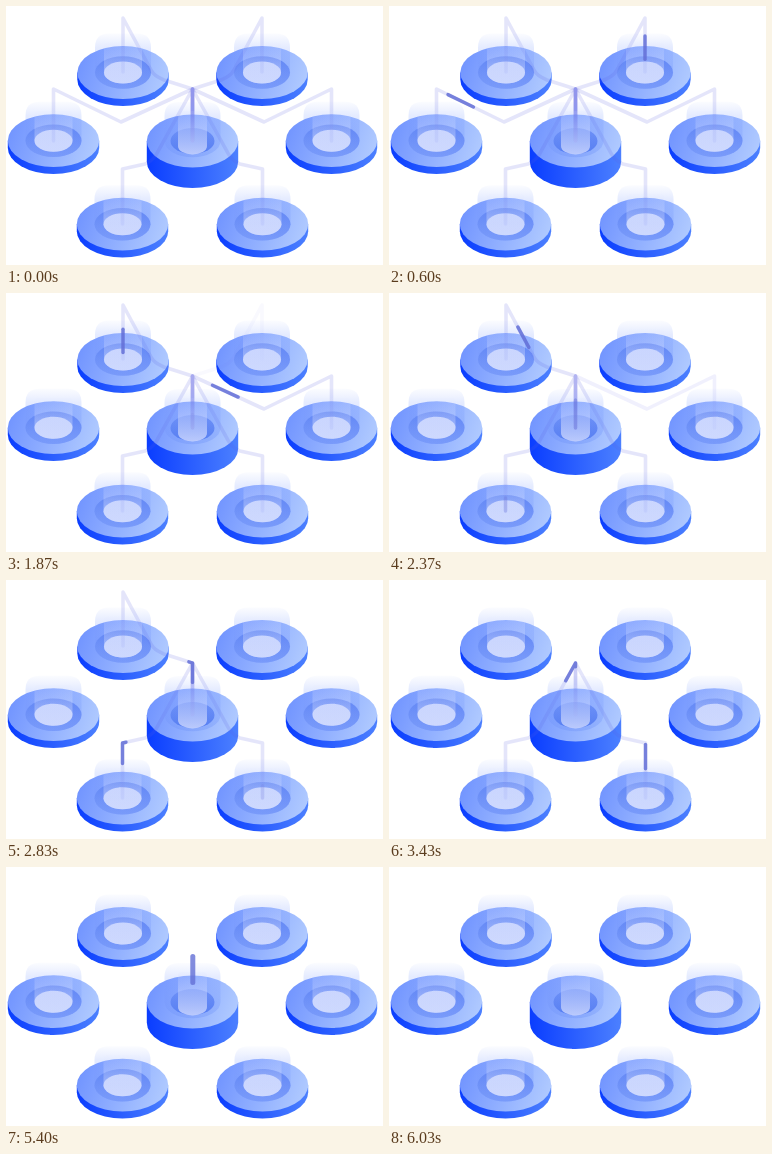
Recreate the animation shown at these times as an HTML page. Size 377 by 259 pixels, loop 6660 ms.

```html
<!DOCTYPE html>
<html lang="en">
<head>
<meta charset="utf-8">
<title>Network nodes</title>
<style>
  html, body { margin: 0; width: 100%; height: 100%; overflow: hidden; background: #fff; }
  svg { display: block; width: 100vw; height: 100vh; }
  .line { fill: none; stroke-linecap: round; stroke-linejoin: round; }
  .track { stroke: #5a5fe0; stroke-opacity: .16; stroke-width: 3.6; }
  .pulse { stroke: #636fd6; stroke-opacity: .85; stroke-width: 3.4; stroke-dasharray: .11 2; }
  .beam { stroke: #636fd6; stroke-opacity: .8; stroke-width: 5; }
</style>
</head>
<body>
<svg id="stage" viewBox="0 0 377 259">
  <defs>
    <linearGradient id="top" x1="0" y1=".4" x2="1" y2=".6">
      <stop offset="0" stop-color="#7295ff"/>
      <stop offset="1" stop-color="#b0caff"/>
    </linearGradient>
    <linearGradient id="side">
      <stop offset="0" stop-color="#0a3dff"/>
      <stop offset="1" stop-color="#4c80ff"/>
    </linearGradient>
    <linearGradient id="ring" x1="0" y1="0" x2="0" y2="1">
      <stop offset="0" stop-color="#5a80f2"/>
      <stop offset="1" stop-color="#7f9ffb"/>
    </linearGradient>
    <linearGradient id="bowl" x1="0" y1="0" x2="0" y2="1">
      <stop offset="0" stop-color="#6a8ef6"/>
      <stop offset="1" stop-color="#4a74ee"/>
    </linearGradient>
    <linearGradient id="core" x1="0" y1="0" x2="0" y2="1">
      <stop offset="0" stop-color="#dbe2ff"/>
      <stop offset="1" stop-color="#e4e9ff"/>
    </linearGradient>
    <linearGradient id="glass" x1="0" y1="0" x2="0" y2="1">
      <stop offset="0" stop-color="#7d9dff" stop-opacity=".03"/>
      <stop offset=".25" stop-color="#7d9dff" stop-opacity=".2"/>
      <stop offset="1" stop-color="#6f93f8" stop-opacity=".38"/>
    </linearGradient>
    <linearGradient id="tube" x1="0" y1="0" x2="0" y2="1">
      <stop offset="0" stop-color="#e0e6ff" stop-opacity=".1"/>
      <stop offset="1" stop-color="#e0e6ff" stop-opacity=".5"/>
    </linearGradient>
    <linearGradient id="hubTube" x1="0" y1="0" x2="0" y2="1">
      <stop offset="0" stop-color="#d3dcff" stop-opacity=".1"/>
      <stop offset="1" stop-color="#d3dcff" stop-opacity=".8"/>
    </linearGradient>
  </defs>
</svg>
<script>
const LOOP = 6660;
const stage = document.getElementById('stage');

function add(parent, tag, attrs) {
  const el = document.createElementNS('http://www.w3.org/2000/svg', tag);
  for (const key in attrs) el.setAttribute(key, attrs[key]);
  return parent.appendChild(el);
}

// Bottom to top: discs, tracks, glass columns, pulses
const [discs, tracks, columns, pulses] = Array.from({ length: 4 }, () => add(stage, 'g', {}));

function ellipse(parent, rx, ry, fill) {
  add(parent, 'ellipse', { rx, ry, fill: `url(#${fill})` });
}

// Upright cylinder: rounded top, elliptical foot
function column(parent, top, foot, w, r, sag, fill) {
  add(parent, 'path', {
    d: `M${-w} ${foot}V${top + r}Q${-w} ${top} ${r - w} ${top}H${w - r}Q${w} ${top} ${w} ${top + r}V${foot}A${w} ${sag} 0 0 1 ${-w} ${foot}Z`,
    fill: `url(#${fill})`
  });
}

function node(x, y, depth, hub) {
  const transform = `translate(${x} ${y})`;
  const base = add(discs, 'g', { transform });
  add(base, 'path', {
    d: `M-45.7 0V${depth}A45.7 26.4 0 0 0 45.7 ${depth}V0Z`,
    fill: 'url(#side)'
  });
  ellipse(base, 45.7, 26.4, 'top');
  const glass = add(columns, 'g', { transform });
  column(glass, -39, 0, 28, 14, 16.2, 'glass');
  if (hub) {
    ellipse(base, 22, 13, 'bowl');
    column(glass, -30, 5, 14.5, 4, 8.4, 'hubTube');
  } else {
    ellipse(base, 28, 16.2, 'ring');
    ellipse(base, 19, 11, 'core');
    column(glass, -30, 0, 19, 4, 11, 'tube');
  }
}

for (const x of [117, 256]) node(x, 66.5, 7);
for (const x of [47.5, 325.5]) node(x, 134.7, 7);
node(186.5, 135, 20.6, true);
for (const x of [116.5, 256.5]) node(x, 218.2, 7);

const SIDE = 'M47.5 135V83L115 116L186.5 83V135';
const UPPER = 'M117 66V12L145 64Q148 70 158 74L186.5 83V135';
const LOWER = 'M116.5 218V163L139 158Q145 156 150 149L186.5 83V135';

// path, mirrored, pulse start, pulse duration, fade start, fade length
const routes = [
  [SIDE, 0, 0, 1610, 1110, 500],
  [UPPER, 1, 212, 1765, 1477, 500],
  [SIDE, 1, 660, 2010, 2150, 500],
  [UPPER, 0, 1515, 1886, 2880, 500],
  [LOWER, 0, 2302, 1739, 3540, 500],
  [LOWER, 1, 2788, 2250, 4480, 360]
].map(([d, mirrored, start, span, fade, fadeSpan]) => {
  const transform = mirrored ? 'translate(373 0) scale(-1 1)' : '';
  const track = add(tracks, 'path', { d, transform, class: 'line track' });
  const pulse = add(pulses, 'path', { d, transform, class: 'line pulse', pathLength: 1 });
  return { track, pulse, start, span, fade, fadeSpan };
});

const beam = add(pulses, 'path', { class: 'line beam' });

const clamp = v => Math.max(0, Math.min(1, v));
const ease = v => (1 - Math.cos(Math.PI * v)) / 2;

function draw(t) {
  for (const r of routes) {
    const p = clamp((t - r.start) / r.span);
    const shown = 1 - clamp((t - r.fade) / r.fadeSpan);
    r.track.style.opacity = shown;
    r.pulse.style.strokeDashoffset = .055 - ease(p);
    r.pulse.style.opacity = shown * clamp(p / .12) * clamp((1 - p) / .1);
  }
  const b = clamp((t - 5100) / 910);
  beam.setAttribute('d', `M186.8 ${118 - 86 * b}v26`);
  beam.style.opacity = clamp(b / .12) * clamp((1 - b) / .12);
}

const begin = performance.now();
function tick() {
  draw((performance.now() - begin) % LOOP);
  requestAnimationFrame(tick);
}
draw(0);
requestAnimationFrame(tick);
</script>
</body>
</html>
```
